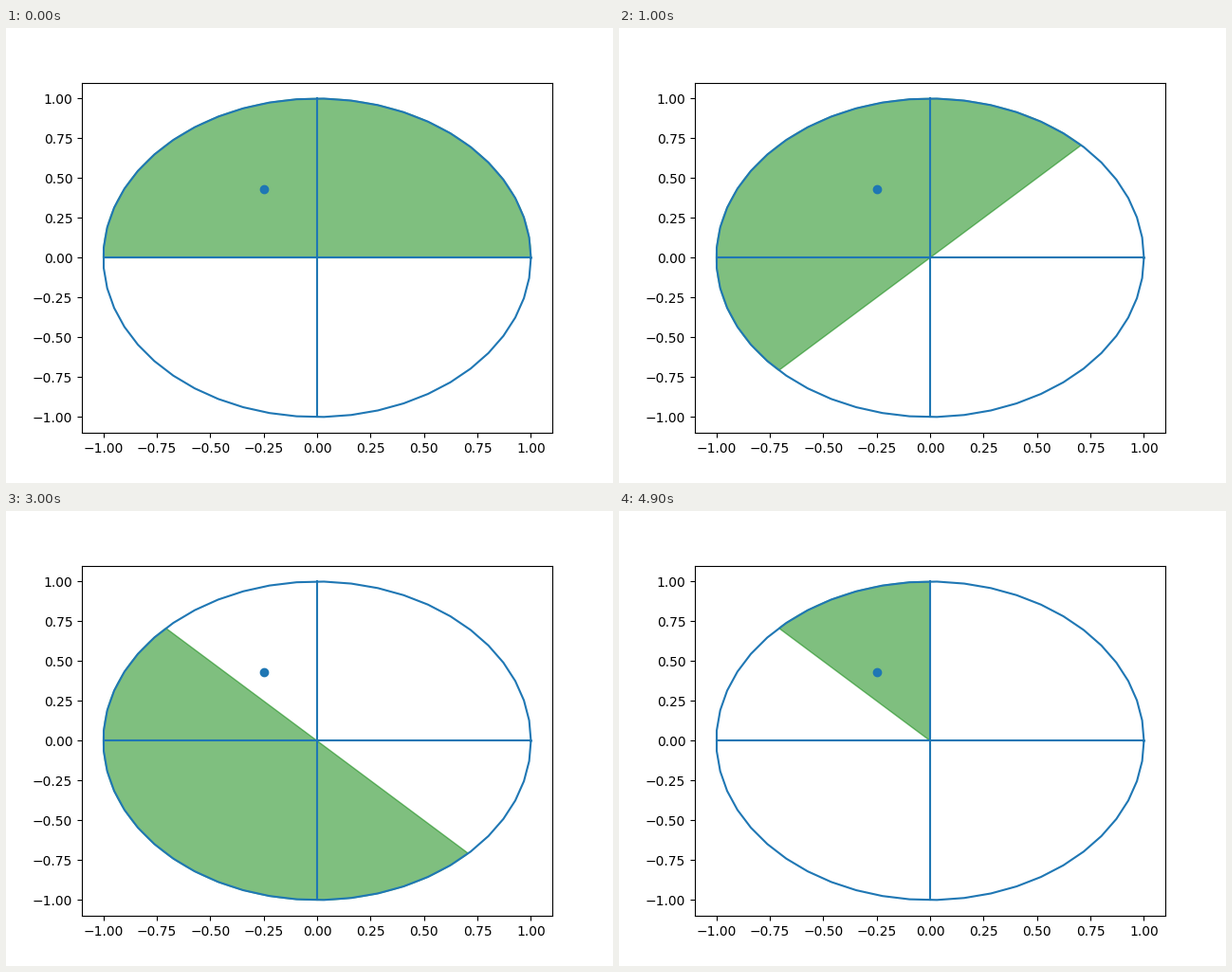
Animation of 640 by 480 pixels, one loop 5500 ms. Source, as a matplotlib script:

```python
import numpy as np
import matplotlib.pyplot as plt
from matplotlib.animation import FuncAnimation
from matplotlib.patches import Wedge

STEP = 500  # ms
BLUE = "#1f77b4"
SECTORS = [(0, 180), (45, 225), (90, 270), (135, 315), (90, 135)]
HOLDS = [2, 2, 2, 2, 3]  # steps each sector stays
ORDER = np.repeat(np.arange(len(SECTORS)), HOLDS)

fig, ax = plt.subplots(figsize=(6.4, 4.8), dpi=100)

theta = np.linspace(0, 2 * np.pi, 50)
ax.plot(np.cos(theta), np.sin(theta), color=BLUE)
ax.plot([-1, 1], [0, 0], color=BLUE)
ax.plot([0, 0], [-1, 1], color=BLUE)

angle = np.radians(120)
ax.plot(0.5 * np.cos(angle), 0.5 * np.sin(angle), "o", color=BLUE)

ax.set_xlim(-1.1, 1.1)
ax.set_ylim(-1.1, 1.1)

sector = ax.add_patch(Wedge((0, 0), 1, *SECTORS[0], color="green", alpha=0.5))


def update(step):
    start, end = SECTORS[ORDER[step]]
    sector.set_theta1(start)
    sector.set_theta2(end)
    return [sector]


anim = FuncAnimation(fig, update, frames=len(ORDER), interval=STEP,
                     init_func=lambda: update(0), repeat=True, repeat_delay=0)
plt.show()
```
